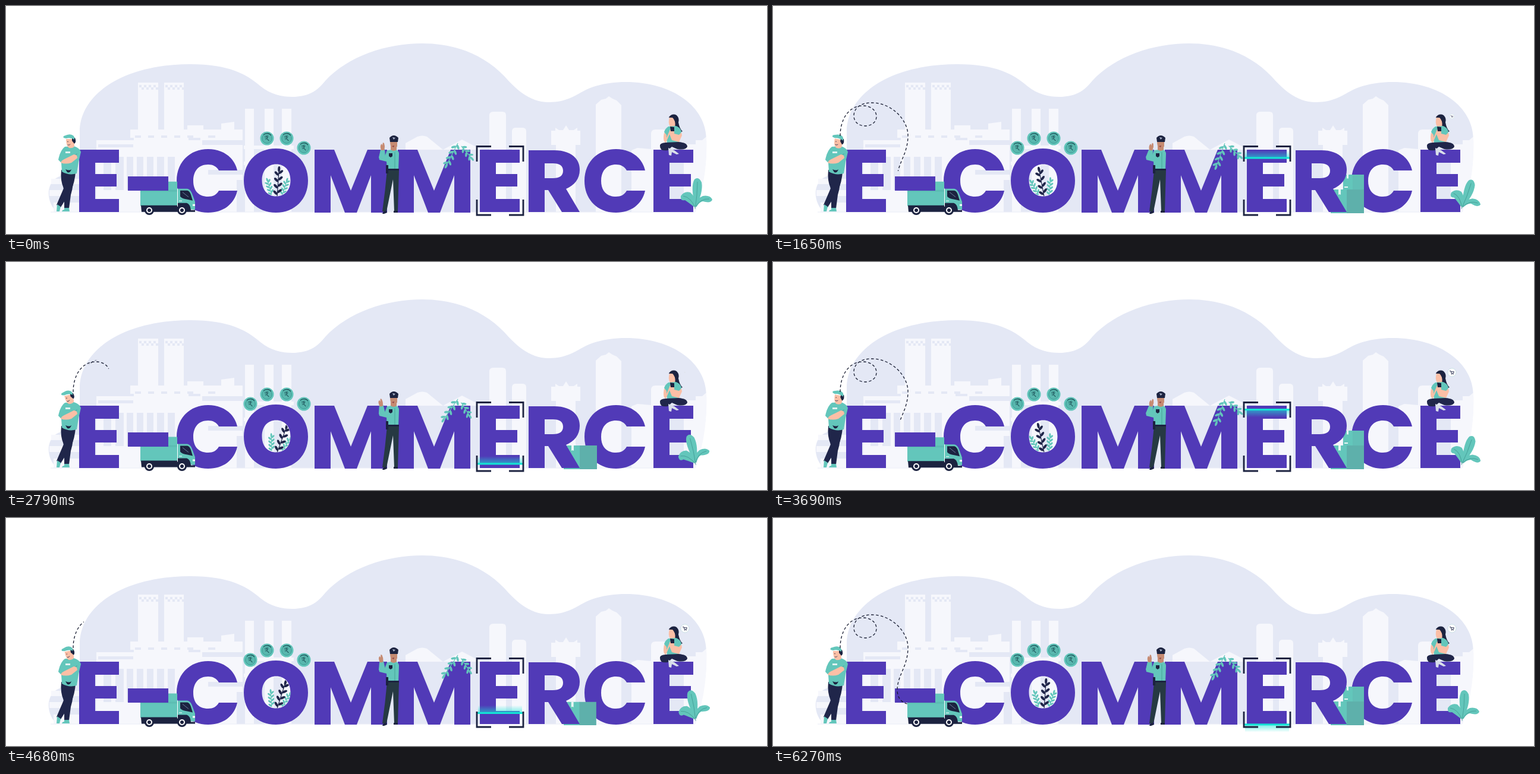
An HTML page for the animation above (6300 ms loop, 1280 by 384 pixels).

```html
<!DOCTYPE html>
<html lang="en">
<head>
<meta charset="utf-8">
<title>E-commerce</title>
<style>
html, body { margin: 0; width: 100%; height: 100%; overflow: hidden; background: #fff; }
svg { display: block; width: 100vw; height: 100vh; }
.sky { fill: #f6f7fc; }
.bg { fill: #e4e8f5; }
.type { fill: #513ab7; }
.teal { fill: #63c6bb; }
.deep { fill: #5eb0ab; }
.navy { fill: #20264a; }
.ink { fill: #1c2340; }
.skin { fill: #fbbfa6; }
.tan { fill: #c68b72; }
.white { fill: #fff; }
.line { fill: none; stroke: #20264a; stroke-linecap: round; }
.vein { fill: none; stroke: #3e958f; stroke-width: .7; }
.coin text { font: 13px "DejaVu Sans", sans-serif; text-anchor: middle; fill: #245f63; }
</style>
</head>
<body>
<svg viewBox="0 0 1280 384" role="img" aria-label="E-COMMERCE">
<defs>
  <linearGradient id="glow" x1="0" y1="0" x2="0" y2="1">
    <stop offset="0" stop-color="#16e6d6" stop-opacity="0"/>
    <stop offset="1" stop-color="#16e6d6" stop-opacity=".6"/>
  </linearGradient>
  <clipPath id="bowl"><ellipse cx="454.5" cy="293.5" rx="24" ry="27"/></clipPath>
  <mask id="reveal" maskUnits="userSpaceOnUse" x="80" y="140" width="180" height="200">
    <path id="wipe" fill="none" stroke="#fff" stroke-width="5" pathLength="1" stroke-dasharray="1 2"/>
  </mask>
  <path id="letterE" d="M0 242H67V264H27V283H63V304H27V325H67V347H0Z"/>
  <path id="letterC" d="M102 277H71C67 270 61 267 53 267C37 267 28 278 28 294.500C28 311 37 321 53 321C61 321 67 318 71 311H102C97 334 78 348 53 348C22 348 0 326 0 294.500C0 263 22 241 53 241C78 241 97 255 102 277Z"/>
  <path id="letterM" d="M0 348V242H33L61 311L89 242H122V348H95V285L71 348H51L27 285V348Z"/>
</defs>

<path class="bg" d="M85 347C69 331 66 303 84 290C100 281 124 277 124 250V212C124 150 195 98 310 98C375 98 405 115 428 135C445 149 464 153 482 153C512 152 524 142 537 126C576 84 640 63 700 63C760 63 806 85 838 118C856 138 879 162 913 162C942 162 957 151 972 143C990 133 1015 128 1042 128C1122 128 1178 170 1178 225C1179 275 1170 315 1158 347Z"/>

<g class="sky">
  <path d="M222 129H256V208H266V129H299V208H305V201H332V208H362V198L384 195V208H398V347H152V226H215V222H209V208H222Z"/>
  <path d="M402 173H417V347H402ZM435 173H450V347H435ZM464 173H480V347H464ZM400 235H484V241H400ZM400 262H484V268H400ZM76 291H124V300H76ZM73 310H124V320H73ZM80 331H124V347H80Z"/>
  <path d="M672 242V231L692 220Q700 217 708 220L735 242ZM735 242L767 225L800 242ZM813 347V183Q814 178 820 178H835Q841 178 841 184V347ZM851 347V210Q852 205 857 205H870Q875 206 875 211V347Z"/>
  <path d="M917 234V210H924V205L930 209H937L942 201L947 209H955L961 205V210H966V234H958V347H925V234ZM992 347V166L1001 158L1009 156L1014 152L1020 156L1027 159L1035 167V347ZM1052 347V243L1062 239L1085 241V214Q1086 208 1092 208H1106Q1112 209 1112 215V347ZM1140 347V233H1160V226H1171L1178 220Q1181 285 1160 347Z"/>
</g>
<g class="bg" id="windows">
  <path d="M217 218H227V222H217ZM239 218H249V222H239ZM261 218H271V222H261ZM283 218H293V222H283ZM305 218H315V222H305ZM155 233H214V238H155ZM307 222H327V226H307ZM340 218H352V222H340Z"/>
  <path d="M164 254H177V310H164ZM184 254H198V310H184ZM203 254H214V310H203ZM220 254H231V310H220ZM237 254H248V310H237ZM254 254H266V310H254ZM272 254H284V310H272ZM330 226H398V234H330ZM340 276H400V284H340ZM388 293H400V347H388Z"/>
</g>
<rect x="75" y="346.500" width="1083" height="1.200" fill="#eef0f8"/>

<g class="type">
  <use href="#letterE" x="123"/>
  <use href="#letterC" x="287"/>
  <path fill-rule="evenodd" d="M454 240C486 240 508 263 508 294S486 348 454 348S400 325 400 294S422 240 454 240ZM454.500 266.500C440 266.500 430.500 277 430.500 293.500S440 320.500 454.500 320.500S478.500 310 478.500 293.500S469 266.500 454.500 266.500Z"/>
  <use href="#letterM" x="519"/>
  <use href="#letterM" x="659"/>
  <use href="#letterE" x="797"/>
  <use href="#letterC" x="973"/>
  <use href="#letterE" x="1089"/>
</g>

<g id="lowBox">
  <path class="teal" d="M938 309H966V349H938Z"/>
  <path class="deep" d="M965 309H994V349H965Z"/>
  <path class="white" d="M951 309H955V318L953 317L951 318Z" opacity=".85"/>
</g>
<g id="topBox">
  <path class="teal" d="M959 284H994V309H959Z"/>
  <path class="deep" d="M975 284H994V309H975Z" opacity=".35"/>
  <path class="white" d="M965 284H968V291L966.500 290L965 291ZM961 304H967V306H961Z" opacity=".85"/>
</g>
<path class="type" fill-rule="evenodd" d="M879 347V243H922C949 243 965 256 965 276C965 291 956 302 942 308L965 347H935L912 310H906V347ZM906 265V290H920C931 290 937 286 937 277.500S931 265 920 265Z"/>

<g clip-path="url(#bowl)">
  <g id="sprigL"></g><g id="sprigR"></g><g id="sprigM"></g>
</g>
<g id="coins"></g>

<g id="truckBody">
  <path class="teal" d="M226 295H288V336H226Z"/>
  <path d="M226 309H288V312H226Z" fill="#4fa9a2" opacity=".35"/>
  <path class="teal" d="M289 307H305Q311 308 314 318L318 329V342H289Z"/>
  <path class="ink" d="M293 310H305Q309 311 311 317L314 327L305 325Q296 324 293 320Z"/>
  <path d="M297 313L307 321" stroke="#6e7f9f" stroke-width="1"/>
  <path class="ink" d="M227 335H289V331H304Q310 333 311 343H318V346H228Z"/>
  <path class="white" d="M288 307H289V337H288ZM291 327H296V328H291ZM314 333H318V336H314Z"/>
</g>
<g id="wheels"></g>
<path class="type" d="M205 287H273V311H205Z"/>

<g id="man">
  <path class="navy" d="M93 276L117 279Q116 296 109 312L97 331L92 339L85 335L97 307Q91 294 93 276Z"/>
  <path class="navy" d="M94 279L111 281Q115 300 109 318L106 341H98L98 319Z"/>
  <path class="teal" d="M86 334L92 338L90 346H85ZM98 340H106L107 346H94Q95 343 98 343Z"/>
  <path class="teal" d="M99 237L114 236Q124 239 126 246L122 263L119 282Q106 286 94 279L93 264L88 259Q91 243 99 237Z"/>
  <path d="M93 262L106 255L120 249" class="vein"/>
  <path class="skin" d="M92 264Q93 260 98 258L114 250Q120 250 120 256L110 264Q100 267 92 264Z"/>
  <path class="ink" d="M100 275Q107 278 110 275Q108 282 103 280Z"/>
  <path class="white" d="M100 245H108V248H100Z" opacity=".8"/>
  <g id="manHead">
    <path class="skin" d="M101 224H115V236Q113 240 106 239Q101 236 101 224Z"/>
    <path class="ink" d="M111 222H116Q119 229 115 232L111 227Z"/>
    <path class="teal" d="M97 222Q95 219 100 218Q109 214 114 219Q116 222 115 225Q109 221 101 223Z"/>
    <circle cx="104" cy="228.500" r=".7" class="ink"/>
    <path class="line" stroke-width=".8" d="M104 234Q107 235 108 233"/>
  </g>
</g>

<g id="guard">
  <path fill="#263943" d="M641 276H661L659 346H653L651 292L640 346H633Q638 310 641 276Z"/>
  <path class="ink" d="M633 350Q634 345 640 345L641 348L636 350ZM652 345H659V348H652Z"/>
  <path class="teal" d="M641 243L655 241Q661 244 661 249L660 277H641L640 262L628 259L627 254L637 253Z"/>
  <path class="tan" d="M647 234H657V242Q652 246 647 242Z"/>
  <path class="tan" d="M646 227H658V236Q656 242 650 240Q646 238 646 227Z"/>
  <path class="ink" d="M645 222Q652 214 660 222L659 229H646ZM639 268H643V282H639ZM641 274H661V277H641Z"/>
  <path d="M650 221L655 222L652 225Z" fill="#a8b2c7"/>
  <path class="ink" d="M644 248H650V253L647 255L644 253Z"/>
  <path class="vein" d="M654 246V274"/>
  <path d="M649 236L653 235L652 238Z" fill="#8f3f42"/>
  <g id="wave">
    <path class="teal" d="M627 255L630 242L637 241L638 254Q634 261 627 255Z"/>
    <path class="tan" d="M631 243Q628 235 632 232L633 235L634 230L636 231L637 236Q637 240 636 243Z"/>
  </g>
</g>

<g id="vines"></g>

<g id="girl">
  <path class="ink" d="M1115 187Q1121 180 1128 184Q1133 189 1131 196Q1133 207 1138 211Q1130 216 1125 207Z"/>
  <path class="skin" d="M1116 188Q1118 183 1125 187L1126 196L1125 207L1117 203Q1113 197 1116 188Z"/>
  <path class="ink" d="M1116 188Q1119 181 1127 186Q1130 198 1126 203Q1126 192 1121 188Z"/>
  <path class="teal" d="M1114 203L1127 202Q1135 205 1136 212L1133 220L1132 231H1112L1110 217L1107 212Q1109 206 1114 203Z"/>
  <path class="skin" d="M1107 213L1111 217L1111 222L1117 208H1124V215L1132 217L1136 213L1137 218L1132 229L1120 226L1116 216L1110 230Q1104 229 1107 213Z"/>
  <path class="ink" d="M1117 203L1124 204L1124 211L1118 211Z"/>
  <path class="navy" d="M1100 236Q1099 231 1109 230L1131 229Q1146 230 1146 237Q1143 243 1129 241L1120 237L1113 243Q1100 245 1100 236Z"/>
  <path d="M1114 239L1124 243L1132 249L1128 250L1120 246L1119 252L1115 251Z" fill="#d9deea"/>
</g>
<g id="cart">
  <circle r="7" class="white" stroke="#b9d9dc" stroke-width=".7"/>
  <path class="line" stroke-width=".9" d="M-3.500 -2.500H-2L-1 1.500H2.500L3.300 -1.300H-1.500"/>
  <circle cx="-.5" cy="3" r=".7" class="ink"/><circle cx="2" cy="3" r=".7" class="ink"/>
</g>

<g id="plant">
  <path class="teal" d="M1159 338Q1151 303 1158 292Q1165 286 1170 297Q1173 315 1160 338ZM1157 338Q1148 331 1142 327Q1134 329 1135 320Q1141 311 1151 314Q1160 321 1159 338ZM1160 336Q1162 324 1172 320Q1184 318 1188 326Q1186 333 1172 329Q1166 330 1161 339Z"/>
  <path class="vein" d="M1159 342Q1163 318 1163 296M1159 340Q1152 322 1139 320M1160 338Q1168 324 1183 325"/>
</g>

<path d="M0 0" id="trail" fill="none" stroke="#161b30" stroke-width="1.300" stroke-dasharray="4.500 3.500" mask="url(#reveal)"/>

<g id="scan">
  <rect id="halo" x="794" y="-13" width="74" height="13" fill="url(#glow)"/>
  <rect x="793" y="-1.500" width="76" height="3" fill="#13e5d5"/>
</g>
<path d="M816 236.500H792V262M846 236.500H870V262M816 352H792V326M846 352H870V326" fill="none" stroke="#1c2340" stroke-width="2.800"/>
</svg>

<script>
const LOOP = 6300, SWING = 900, DRAW = 2100, POP = 1260;
const $ = id => document.getElementById(id);
const clamp = v => Math.max(0, Math.min(1, v));
const ease = v => (1 - Math.cos(Math.PI * clamp(v))) / 2;
const put = (id, value) => $(id).setAttribute('transform', value);
const turn = (id, angle, x, y) => put(id, `rotate(${angle} ${x} ${y})`);
const grow = (id, s, x, y) => put(id, `translate(${x} ${y}) scale(${s})`);

// A stem with paired leaves, standing on the origin.
function sprig(height, pairs, size, color) {
  let out = `<path d="M0 0V${-height}" stroke="${color}" stroke-width="1.200"/>`;
  const leaf = (y, a) => `<ellipse cx="0" cy="${-size}" rx="${size * .45}" ry="${size}" fill="${color}"
    transform="translate(0 ${y}) rotate(${a})"/>`;
  for (let i = 0; i < pairs; i++) {
    const y = -height * (i + .6) / pairs;
    out += leaf(y + 3, -48) + leaf(y, 48);
  }
  return out + leaf(-height + 1, 0);
}
const plantAt = (x, y, a, body) => `<g transform="translate(${x} ${y}) rotate(${a})">${body}</g>`;

$('sprigL').innerHTML = plantAt(447, 318, -17, sprig(24, 4, 3.4, '#63c6bb'));
$('sprigR').innerHTML = plantAt(465, 318, 17, sprig(24, 4, 3.4, '#63c6bb'));
$('sprigM').innerHTML = plantAt(456, 321, 4, sprig(43, 4, 4.6, '#20264a'));
$('vines').innerHTML =
  plantAt(760, 231, 207, sprig(40, 4, 4.3, '#63c6bb')) +
  plantAt(766, 236, 140, sprig(25, 3, 4, '#63c6bb'));

const coinSpots = [[411, 239], [439, 223], [472, 223], [501, 239]];
$('coins').innerHTML = coinSpots.map(([x, y], i) => `
  <g class="coin" id="coin${i}" transform="translate(${x} ${y})">
    <circle r="11.500" class="teal"/>
    <circle r="8.300" fill="#59b7ae" stroke="#318e8b" stroke-width=".8"/>
    <path d="M-6 -6A8.500 8.500 0 0 1 7 -5" fill="none" stroke="#245f63" stroke-width="1.400"/>
    <text y="5" transform="rotate(-14)">₹</text>
  </g>`).join('');

$('wheels').innerHTML = [241, 296].map(x => `
  <circle cx="${x}" cy="344" r="8" class="ink"/>
  <circle cx="${x}" cy="344" r="5" class="white"/>
  <circle cx="${x}" cy="344" r="3" class="ink"/>`).join('');

// Checkered rims on the two towers
let checks = '';
for (const x0 of [224, 268])
  for (let i = 0; i < 8; i++)
    checks += `<rect x="${x0 + i * 4}" y="${i % 2 ? 137 : 133}" width="4" height="4"/>`;
$('windows').insertAdjacentHTML('beforeend', checks);

const flight = 'M113 219C113 190 128 168 151 168C166 168 174 177 174 186C174 196 165 202 155 202' +
  'C144 202 136 195 136 185C136 172 147 163 166 163C200 163 227 192 227 218' +
  'C227 250 209 265 209 290C209 302 216 311 226 313';
$('trail').setAttribute('d', flight);
$('wipe').setAttribute('d', flight);

const poses = [0, -1, 1, -1, 1, -1, 1, 0];
function sway(t) {
  const i = Math.floor(t / SWING);
  return poses[i] + (poses[i + 1] - poses[i]) * ease(t / SWING - i);
}

function draw(t) {
  const s = sway(t);
  turn('manHead', 12 * s, 107, 239);
  turn('wave', 10 * s, 633, 256);
  turn('vines', -8 * s, 762, 232);
  turn('plant', 18 * s, 1159, 338);
  turn('sprigL', -16 * s, 447, 318);
  turn('sprigR', -16 * s, 465, 318);
  turn('sprigM', -17 * s, 456, 321);

  const leg = Math.floor(t / SWING), part = t / SWING - leg, down = leg % 2 === 0;
  put('scan', `translate(0 ${237 + 114.5 * (down ? part : 1 - part)})`);
  put('halo', down ? 'scale(1 -1)' : '');
  $('scan').style.opacity = t < 30 ? 0 : 1;

  const d = t % DRAW;
  $('wipe').setAttribute('stroke-dashoffset', 1 - ease(d / DRAW));
  $('trail').style.visibility = d < 30 ? 'hidden' : 'visible';
  const low = ease(d / 530), top = ease((d - 690) / 230);
  put('lowBox', `translate(938 349) scale(${low}) translate(-938 -349)`);
  put('topBox', `translate(976 309) scale(${top}) translate(-976 -309)`);
  grow('coin0', ease(d / 330), ...coinSpots[0]);

  grow('cart', ease((t % POP - 195) / 375), 1142, 186);
  put('truckBody', `translate(0 ${.7 * Math.cos(t / 420 * 2 * Math.PI)})`);
}

const start = performance.now();
function tick(now) {
  draw(Math.max(0, now - start) % LOOP);
  requestAnimationFrame(tick);
}
draw(0);
requestAnimationFrame(tick);
</script>
</body>
</html>
```
